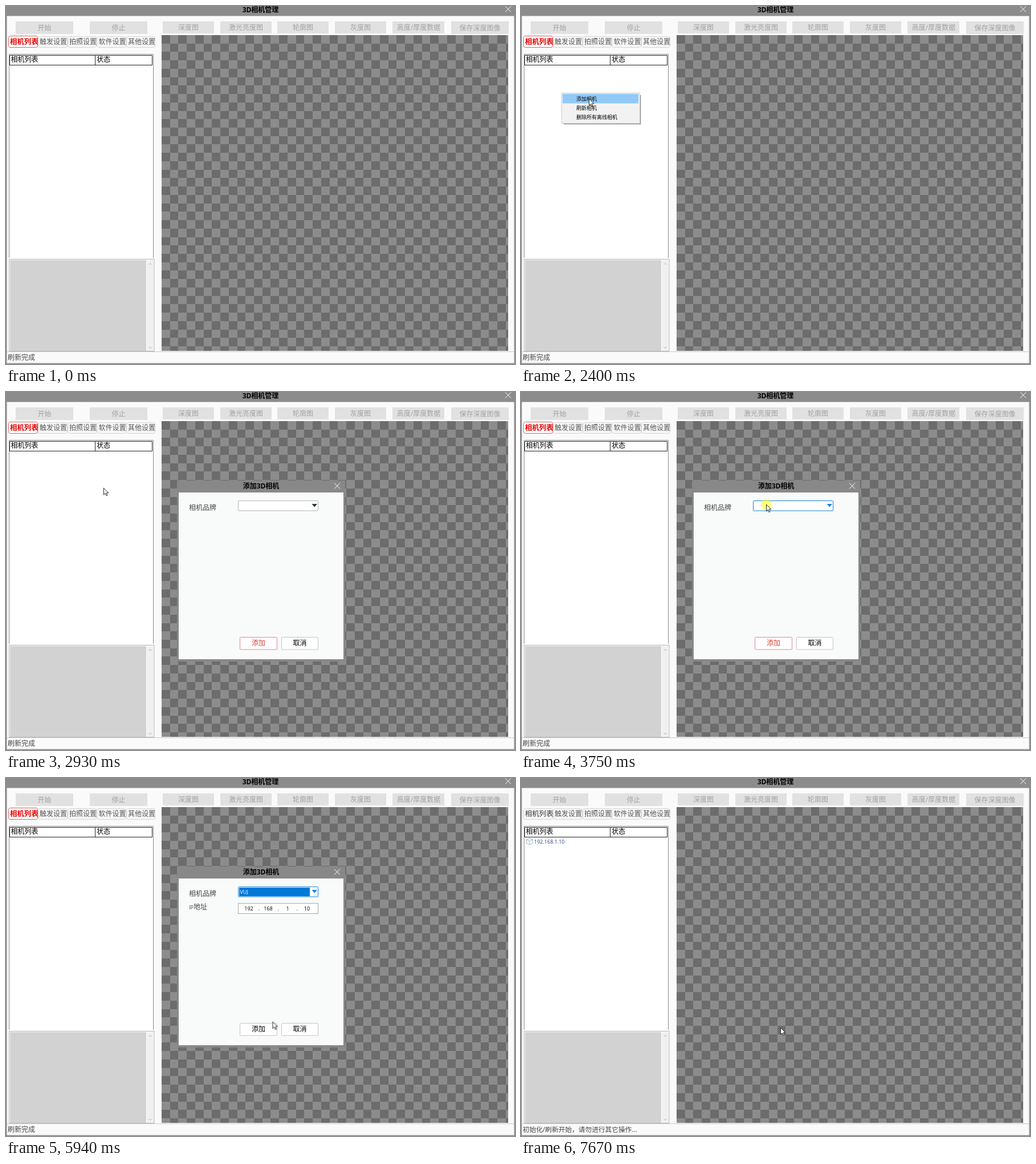
An HTML page with a canvas for the animation above (8 s loop, 893x627 px).

```html
<!DOCTYPE html>
<html lang="zh-CN">
<head>
<meta charset="utf-8">
<title>3D相机管理</title>
<style>
html, body { margin: 0; width: 100%; height: 100%; overflow: hidden; background: #fafafa; }
canvas, svg { position: absolute; left: 0; top: 0; display: block; }
canvas { left: 273px; top: 51px; }
text { font: 12px "Open Sans", "Noto Sans CJK SC", "Noto Sans CJK", sans-serif; fill: #444; }
.mid { text-anchor: middle; }
.bold { font-weight: 700; fill: #000; }
.dark { fill: #000; }
.white { fill: #fff; }
text.small { font-size: 9px; }
.off text { fill: #a0a0a0; text-anchor: middle; }
.off rect { fill: #e1e1e1; }
.tab rect { fill: #f7f7f7; stroke: #d4d4d4; }
.tab text { fill: #555; }
.line { fill: none; stroke-width: 1; }

/* one shared 8 s clock */
.a { animation: 8s step-end infinite; }
.cursor { animation: show 8s step-end infinite, path 8s linear infinite; }
@keyframes show { 0% { opacity: 0 } 1.625% { opacity: 1 } }
@keyframes path {
  0%, 1.625% { transform: translate(600px, 591px); animation-timing-function: steps(4) }
  5.125% { transform: translate(273px, 482px); animation-timing-function: steps(3) }
  7.625% { transform: translate(115px, 399px); animation-timing-function: steps(4) }
  11.125% { transform: translate(111px, 179px); animation-timing-function: steps(4) }
  14.6%, 24.625% { transform: translate(71.5px, 153px); animation-timing-function: steps(6) }
  30%, 34.75% { transform: translate(119px, 162px); animation-timing-function: steps(12) }
  45.125%, 50.25% { transform: translate(430px, 196.5px); animation-timing-function: steps(11) }
  59.75%, 68.125% { transform: translate(432px, 252px); animation-timing-function: steps(5) }
  72.5% { transform: translate(474px, 395px); animation-timing-function: steps(2) }
  74.25% { transform: translate(467.5px, 426.5px); animation-timing-function: steps(2) }
  76%, 79.25% { transform: translate(454px, 433px); animation-timing-function: step-end }
  79.26%, 100% { transform: translate(455px, 437px) }
}
.click { animation-name: click; }
@keyframes click {
  0%, 22.125%, 33.875%, 47.75%, 64.875%, 83.5% { opacity: 0 }
  18.625%, 32.375%, 46%, 63.125%, 81.75% { opacity: 1 }
}
.menu { animation-name: menu; }
@keyframes menu {
  0% { opacity: 0 } 21.25% { opacity: .35 } 22.125% { opacity: .75 } 23% { opacity: 1 }
  34.75% { opacity: .28 } 35.625% { opacity: 0 }
}
.hover { animation-name: hover; }
@keyframes hover { 0% { opacity: 0 } 26.375% { opacity: 1 } }
.dialog { animation-name: dialog; transform-origin: 447.5px 313px; }
@keyframes dialog {
  0% { opacity: 0; transform: scale(.96) }
  34.75% { opacity: .42; transform: scale(.972) }
  35.625% { opacity: .85; transform: scale(.99) }
  36.5% { opacity: 1; transform: none }
  83.5% { opacity: .6; transform: scale(.985) }
  85.125% { opacity: .25; transform: scale(.965) }
  86% { opacity: 0; transform: scale(.96) }
}
.combo { fill: #fff; stroke: #b4b4b4; animation-name: combo; }
@keyframes combo { 0% { stroke: #b4b4b4 } 45.125% { stroke: #1883d7 } }
.arrow { animation-name: arrow; }
@keyframes arrow { 0% { fill: #333 } 45.125% { fill: #1883e0 } }
.list { animation-name: list; }
@keyframes list { 0%, 64% { opacity: 0 } 48.625% { opacity: 1 } }
.i1 { animation-name: i1; }
.i2 { animation-name: i2; }
.i3 { animation-name: i3; }
@keyframes i1 { 0%, 55.75% { opacity: 0 } 53.125% { opacity: 1 } }
@keyframes i2 { 0%, 58.25% { opacity: 0 } 55.75% { opacity: 1 } }
@keyframes i3 { 0% { opacity: 0 } 58.25% { opacity: 1 } }
.picked { animation-name: picked; }
@keyframes picked { 0% { opacity: 0 } 64% { opacity: 1 } }
.add { animation-name: add; }
@keyframes add {
  0%, 75.125% { stroke: #e8858b } 47.75% { stroke: #c4c4c4 }
}
.addtext { animation-name: addtext; }
@keyframes addtext {
  0%, 75.125% { fill: #d9402f } 47.75% { fill: #000 }
}
.early { animation-name: early; }
@keyframes early { 0% { opacity: 1 } 83.5% { opacity: 0 } }
.ready { animation-name: ready; }
@keyframes ready { 0% { opacity: 1 } 86% { opacity: 0 } }
.busy { animation-name: busy; }
@keyframes busy { 0% { opacity: 0 } 86% { opacity: 1 } }
.row { animation-name: row; }
@keyframes row { 0% { opacity: 0 } 95.875% { opacity: 1 } }
</style>
</head>
<body>
<canvas id="board" width="608" height="553"></canvas>
<svg width="893" height="627" viewBox="0 0 893 627">
  <!-- window frame -->
  <g fill="#8c8c8c">
    <rect width="893" height="17.5"/>
    <rect width="1.5" height="627"/>
    <rect x="891.5" width="1.5" height="627"/>
    <rect y="625.5" width="893" height="1.5"/>
  </g>
  <text class="mid bold" x="446.5" y="10.5">3D相机管理</text>
  <path class="line" stroke="#fff" d="M876 .5l10 10m0-10l-10 10"/>

  <!-- toolbar -->
  <g class="off">
    <rect x="17" y="27" width="101" height="22"/><text x="67.5" y="43">开始</text>
    <rect x="147" y="27" width="101" height="22"/><text x="197.5" y="43">停止</text>
    <rect x="275" y="27" width="90" height="21"/><text x="320" y="42">深度图</text>
    <rect x="376" y="27" width="90" height="21"/><text x="421" y="42">激光亮度图</text>
    <rect x="476" y="27" width="90" height="21"/><text x="521" y="42">轮廓图</text>
    <rect x="577" y="27" width="90" height="21"/><text x="622" y="42">灰度图</text>
    <rect x="678" y="27" width="91" height="21"/><text x="724" y="42">高度/厚度数据</text>
    <rect x="781" y="27" width="101" height="22"/><text x="831.5" y="43">保存深度图像</text>
  </g>

  <!-- tabs -->
  <g class="tab">
    <rect x="4.5" y="53.5" width="51" height="19" rx="3"/>
    <text x="7" y="66.5" style="fill:#333;font-weight:500;font-size:12.4px">相机列表</text>
    <rect x="56.5" y="53.5" width="51" height="19" rx="3"/><text x="59" y="66.5">触发设置</text>
    <rect x="108.5" y="53.5" width="50" height="19" rx="3"/><text x="111" y="66.5">拍照设置</text>
    <rect x="159.5" y="53.5" width="51" height="19" rx="3"/><text x="162.5" y="66.5">软件设置</text>
    <rect x="211.5" y="53.5" width="50" height="19" rx="3"/><text x="214" y="66.5">其他设置</text>
    <g class="a early">
      <rect x="4.5" y="52.5" width="51" height="20" rx="3" style="fill:#fff;stroke:#e0605c"/>
      <text x="7" y="66.5" style="fill:#e60000;font-weight:700;font-size:12.4px">相机列表</text>
    </g>
  </g>

  <!-- camera table -->
  <rect x="6" y="85" width="252" height="357" fill="#fff"/>
  <path class="line" stroke="#8c8c8c" d="M5.5 441V84.5H258.5V441"/>
  <path class="line" stroke="#222" d="M6.5 86.5h250v17h-250zM156.5 86v18"/>
  <text class="dark" x="8.5" y="98">相机列表</text>
  <text class="dark" x="159" y="98">状态</text>
  <g class="a row">
    <path class="line" stroke="#9db8c2" d="M15 105.5l5.5 2.5v6l-5.5 3-5.5-3v-6zM9.5 108l5.5 2.5 5.5-2.5M15 110.500v6"/>
    <text class="small" x="23" y="115.200" style="fill:#2c3f86">192.168.1.10</text>
  </g>

  <!-- log pane -->
  <rect x="5.500" y="443.500" width="254.500" height="161" fill="#fff" stroke="#b4b4b4"/>
  <rect x="7" y="445" width="239" height="159" fill="#d2d2d2"/>
  <rect x="247" y="445" width="12" height="159" fill="#f0f0f0"/>
  <path class="line" stroke="#b0b0b0" d="M250.500 453l2.500-2.500 2.500 2.500M250.500 597l2.500 2.500 2.500-2.500"/>

  <!-- status bar -->
  <path class="line" stroke="#c8c8c8" d="M1.500 605.500h890"/>
  <text class="a ready" x="3" y="620">刷新完成</text>
  <text class="a busy" x="3" y="620" style="font-size:11.7px">初始化/刷新开始，请勿进行其它操作...</text>

  <!-- context menu -->
  <g class="a menu">
    <rect x="75" y="156" width="136" height="52" fill="#000" opacity=".12"/>
    <rect x="75" y="156" width="135" height="51" fill="#000" opacity=".35"/>
    <rect x="71.500" y="152.500" width="137" height="53" fill="#f2f2f2" stroke="#ccc"/>
    <rect class="a hover" x="73" y="154" width="133" height="16.500" fill="#91c9f7"/>
    <text class="small dark" x="97" y="165.500">添加相机</text>
    <text class="small dark" x="97" y="181.500">刷新相机</text>
    <text class="small dark" x="97" y="198">删除所有离线相机</text>
  </g>

  <!-- add dialog -->
  <g class="a dialog">
    <rect x="300" y="155" width="295" height="317" fill="#888"/>
    <rect x="303" y="176" width="289" height="292" fill="#f9fbfb"/>
    <text class="mid bold" x="447.500" y="169">添加3D相机</text>
    <path class="line" stroke="#fff" d="M576 159.500l10 10m0-10l-10 10"/>
    <text x="321" y="207">相机品牌</text>
    <rect class="a combo" x="407.500" y="190.500" width="140" height="17.500" rx="1"/>
    <path class="a arrow" d="M536.500 196h9.500l-4.750 5.500z"/>
    <g class="a picked">
      <rect x="409" y="192" width="124" height="15" fill="#0078d7"/>
      <text class="small white" x="410.500" y="203">VUJ</text>
      <text x="321" y="230"><tspan font-size="9" style="font-size:9px">IP</tspan>地址</text>
      <rect x="407.500" y="219.500" width="140" height="18" fill="#fff" stroke="#aaa"/>
      <g class="mid">
        <text class="small dark" x="426" y="232">192</text><text class="small dark" x="444" y="232">.</text>
        <text class="small dark" x="460" y="232">168</text><text class="small dark" x="478" y="232">.</text>
        <text class="small dark" x="494" y="232">1</text><text class="small dark" x="511" y="232">.</text>
        <text class="small dark" x="528" y="232">10</text>
      </g>
    </g>
    <rect class="a add" x="410.500" y="429.500" width="65" height="21.500" rx="1" fill="#fff"/>
    <text class="a addtext mid" x="443" y="444">添加</text>
    <rect x="483.500" y="429.500" width="64" height="21.500" rx="1" fill="#fff" stroke="#c4c4c4"/>
    <text class="mid dark" x="515.500" y="444">取消</text>

    <g class="a list">
      <rect x="407.500" y="208.500" width="140" height="65.500" fill="#fff" stroke="#777"/>
      <text class="small dark" x="410.500" y="220.500">品牌一</text>
      <text class="small dark" x="410.500" y="236.500">品牌二</text>
      <text class="small dark" x="410.500" y="252.500">VUJ</text>
      <text class="small dark" x="410.500" y="268.500">其他</text>
      <g fill="#0078d7">
        <g class="a i1"><rect x="408" y="209" width="139" height="16"/><text class="small white" x="410.500" y="220.500">品牌一</text></g>
        <g class="a i2"><rect x="408" y="225" width="139" height="16"/><text class="small white" x="410.500" y="236.500">品牌二</text></g>
        <g class="a i3"><rect x="408" y="241" width="139" height="16"/><text class="small white" x="410.500" y="252.500">VUJ</text></g>
      </g>
    </g>
  </g>

  <g class="cursor">
    <circle class="a click" r="9.500" cy=".5" fill="#ff0" fill-opacity=".5"/>
    <path d="M.5 .5v11.700l2.700-2.500 1.900 4.300 1.900-.8-1.900-4.200h3.900z" fill="#fff" stroke="#111" stroke-width=".9"/>
  </g>
</svg>
<script>
const ctx = document.getElementById('board').getContext('2d');
const cell = 14.73;
const edge = i => Math.round(i * cell);
for (let r = 0; r < 38; r++) {
  for (let c = 0; c < 42; c++) {
    ctx.fillStyle = (r + c) % 2 ? '#8c8c8c' : '#6c6c6c';
    ctx.fillRect(edge(c), edge(r), edge(c + 1) - edge(c), edge(r + 1) - edge(r));
  }
}
</script>
</body>
</html>
```
